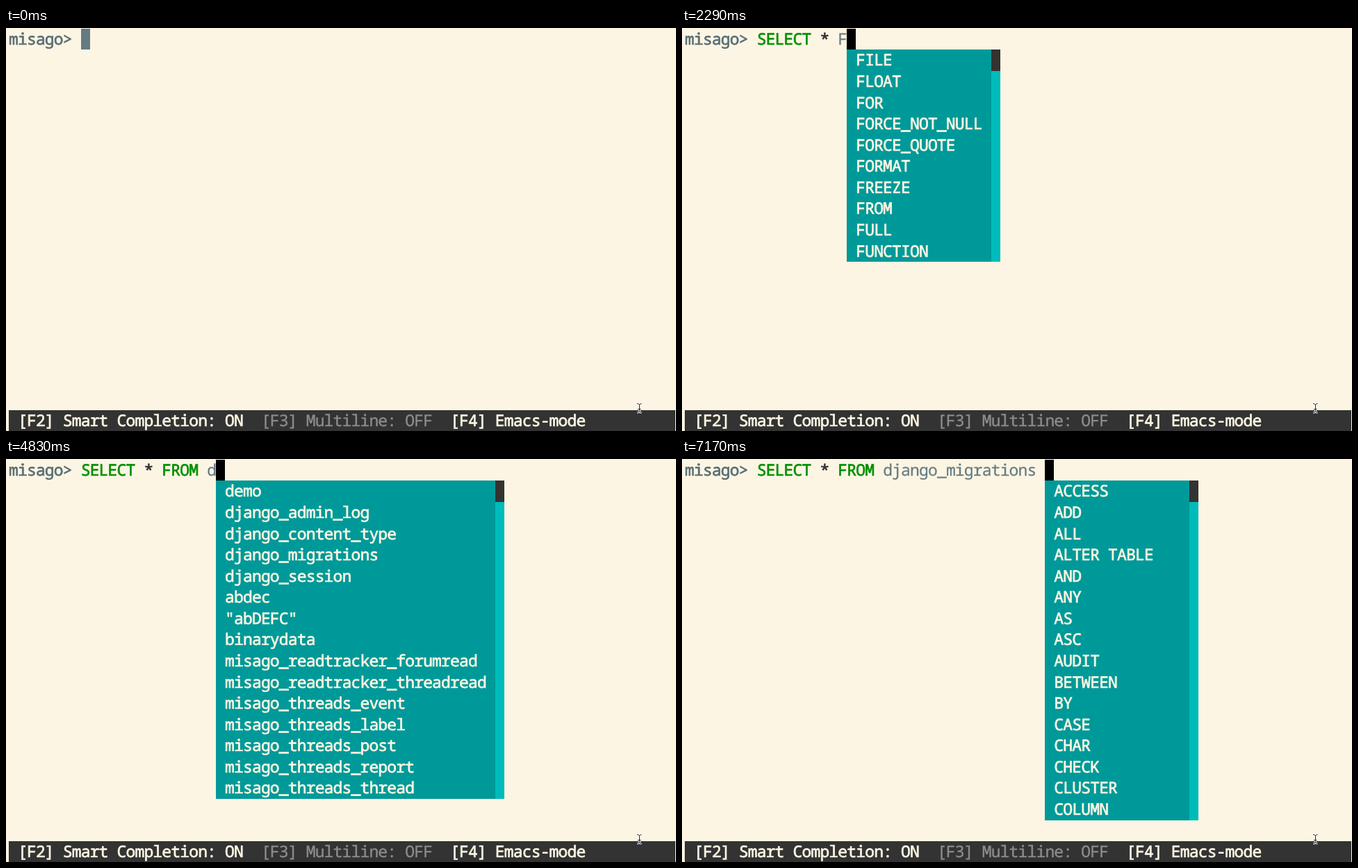
Write an HTML page that moves like this. It is 964 px wide and 581 px high and loops after 8000 ms.

```html
<!DOCTYPE html>
<html lang="en">
<head>
<meta charset="utf-8">
<title>SQL prompt with completion</title>
<style>
  :root { --w: 12.96px; --h: 30.59px; }
  html, body { margin: 0; width: 100%; height: 100%; overflow: hidden; background: #fdf5e3; }
  #screen {
    position: absolute; inset: 0; overflow: hidden;
    font: 23px "Noto Sans Mono", "DejaVu Sans Mono", monospace;
    -webkit-text-stroke: .7px;
    letter-spacing: calc(var(--w) - 1ch);
    line-height: var(--h);
    text-rendering: geometricPrecision;
    font-variant-ligatures: none;
    white-space: pre;
  }
  .cell {
    position: absolute;
    left: calc(4px + var(--col) * var(--w));
    top: calc(.8px + var(--row) * var(--h));
    width: calc(var(--cols) * var(--w));
    height: calc(var(--rows, 1) * var(--h));
  }
  .text { position: relative; top: -1px; }
  .line { color: #657b83; -webkit-text-stroke-width: .25px; }
  .line b { font-weight: inherit; -webkit-text-stroke-width: .7px; }
  .prompt { color: #586e75; }
  .keyword { color: #009000; }
  .star { color: #333; }
  .cursor { background: #657b83; }
  .cursor.busy { background: #000; }
  .menu { background: #099; color: #fdf6e3; }
  .menu div { height: var(--h); }
  .menu .selected { background: #0bb; color: #0c3034; -webkit-text-stroke-width: .25px; }
  .track { background: #0bb; }
  .thumb { background: #333; }
  .bar { background: #333; color: #fdf6e3; left: 4px; width: 959px; }
  .off { color: #8c8c8c; -webkit-text-stroke-width: .4px; }
  svg { position: absolute; left: 904px; top: 538px; }
</style>
</head>
<body>
<div id="screen">
  <div id="view"></div>
  <div class="cell bar" style="--row:18"><span class="text"> [F2] Smart Completion: ON  <span class="off">[F3] Multiline: OFF</span>  [F4] Emacs-mode</span></div>
  <svg width="16" height="20" fill="none">
    <defs><path id="beam" d="M4 3.5Q7 3.5 7.5 5.5Q8 3.5 10.5 3.5M7.5 5V14.5M5 11.5H9.5M4 16.5Q7 16.5 7.5 14.5Q8 16.5 10.5 16.5"/></defs>
    <use href="#beam" stroke="#fff" stroke-width="2.6"/>
    <use href="#beam" stroke="#222"/>
  </svg>
</div>
<script>
const LOOP = 8000;
const PROMPT = 'misago> ';
const words = text => text.split(' ');

const keywords = [...words('ACCESS ADD ALL'), 'ALTER TABLE',
  ...words('AND ANY AS ASC AUDIT BETWEEN BY CASE CHAR CHECK CLUSTER COLUMN')];
const sWords = words('SELECT SESSION SET SHARE SIZE SMALLINT START SUCCESSFUL SYNONYM SYSDATE');
const fWords = words('FILE FLOAT FOR FORCE_NOT_NULL FORCE_QUOTE FORMAT FREEZE FROM FULL FUNCTION');
const functions = words('custom_func1 custom_func2 insert_or_update_counters set_returning_func ' +
  'AVG COUNT DISTINCT FIRST FORMAT LAST LCASE LEN MAX MIN MID NOW').map(name => name.slice(0, 24));
const tables = words('custom information_schema public "INSERT" "abDEFC" "select" "√abc" abc abdec ' +
  'auth_group auth_group_permissions auth_permission bigserial_tbl binarydata booltest demo');
const django = words('django_admin_log django_content_type django_migrations django_session');
const dTables = ['demo', ...django, ...words('abdec "abDEFC" binarydata ' +
  'misago_readtracker_forumread misago_readtracker_threadread misago_threads_event ' +
  'misago_threads_label misago_threads_post misago_threads_report misago_threads_thread')];
const djm = [django[2], django[0]];

// fit: longest entry including those below the visible rows
// anchor: length of the typed text when the menu opened
const steps = [
  { at: 0, text: '' },
  { at: 300, text: 'S', items: sWords },
  { at: 570, text: 'SE', items: sWords.slice(0, 3) },
  { at: 980, text: 'SELECT', items: sWords.slice(0, 3), anchor: 2 },
  { at: 1310, text: 'SELECT ', items: functions, fit: 24 },
  { at: 1790, text: 'SELECT *' },
  { at: 1900, text: 'SELECT * ', items: keywords, fit: 14 },
  { at: 2290, text: 'SELECT * F', items: fWords },
  { at: 2470, text: 'SELECT * FR', items: ['FREEZE', 'FROM'] },
  { at: 2590, text: 'SELECT * FRO', items: ['FROM'] },
  { at: 3160, text: 'SELECT * FROM', items: ['FROM'], anchor: 12 },
  { at: 3330, text: 'SELECT * FROM ', items: tables, fit: 34 },
  { at: 4830, text: 'SELECT * FROM d', items: dTables },
  { at: 5100, text: 'SELECT * FROM dj', items: django },
  { at: 5550, text: 'SELECT * FROM djm', items: djm },
  { at: 6120, text: 'SELECT * FROM djmi', items: djm },
  { at: 6660, text: 'SELECT * FROM django_migrations', items: djm, anchor: 18 },
  { at: 7170, text: 'SELECT * FROM django_migrations ', items: keywords, fit: 14 },
];

const cell = (name, col, row, cols, rows, content = '') =>
  `<div class="cell ${name}" style="--col:${col};--row:${row};--cols:${cols};--rows:${rows}">${content}</div>`;

const highlight = text => text
  .replace(/\b(SELECT|FROM)\b/g, '<b class="keyword">$1</b>')
  .replace('*', '<b class="star">*</b>');

function menu({ text, items, fit, anchor }) {
  const col = PROMPT.length + (anchor ?? text.length);
  const cols = (fit ?? Math.max(...items.map(item => item.length))) + 2;
  const rows = items.map((item, i) =>
    `<div class="${anchor && i === 0 ? 'selected' : ''}"><span class="text"> ${item}</span></div>`).join('');
  return cell('menu', col, 1, cols, items.length, rows) +
    cell('track', col + cols, 1, 1, items.length) +
    cell('thumb', col + cols, 1, 1, 1);
}

function render(step) {
  const line = `<span class="text"><b class="prompt">misago&gt; </b>${highlight(step.text)}</span>`;
  return cell('line', 0, 0, 74, 1, line) +
    cell(step.items ? 'cursor busy' : 'cursor', PROMPT.length + step.text.length, 0, 1, 1) +
    (step.items ? menu(step) : '');
}

const view = document.getElementById('view');
const start = performance.now();
let shown;

function tick() {
  const time = (performance.now() - start) % LOOP;
  const step = steps.findLast(s => s.at <= time);
  if (step !== shown) {
    view.innerHTML = render(step);
    shown = step;
  }
  requestAnimationFrame(tick);
}
tick();
</script>
</body>
</html>
```
